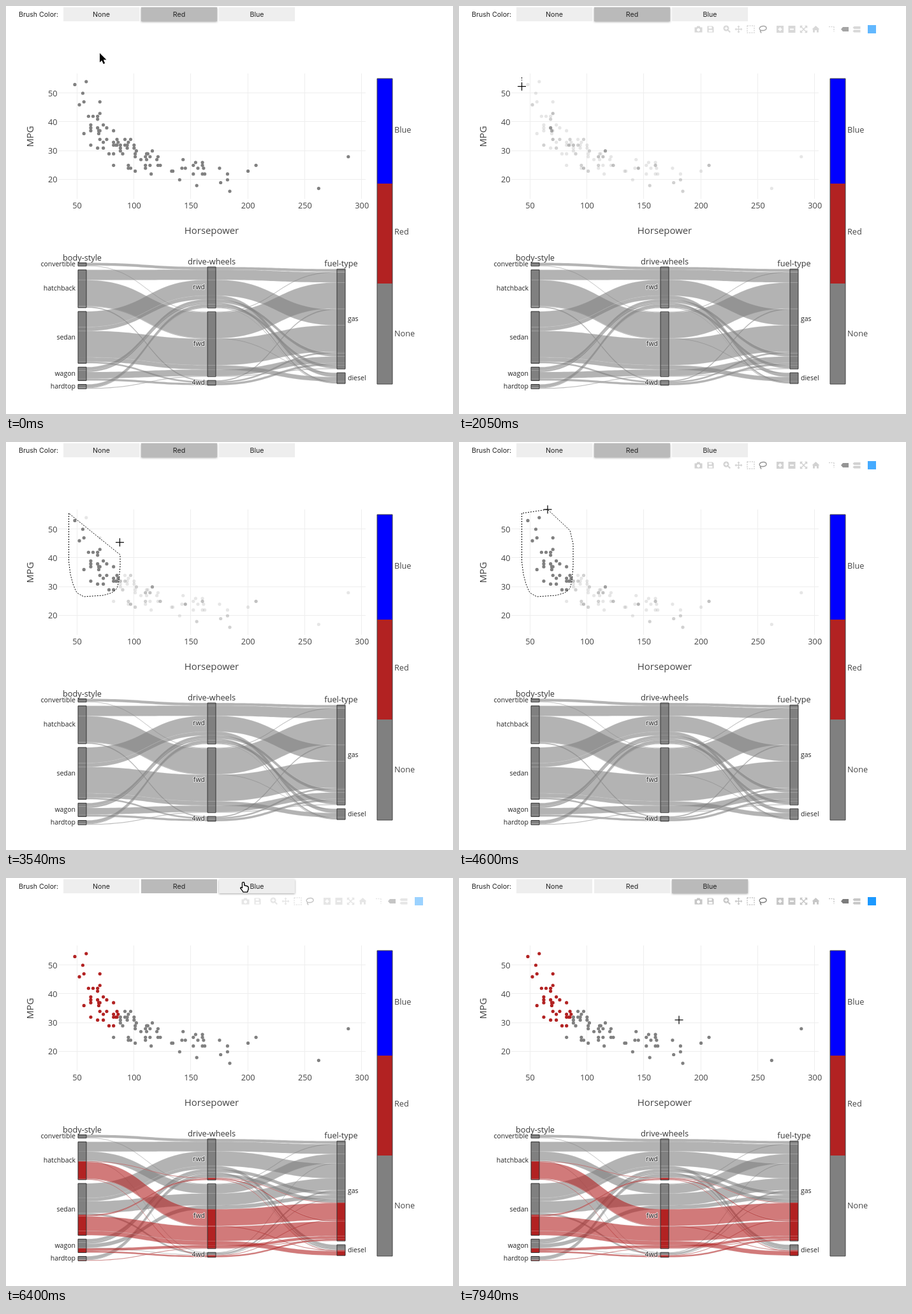
Recreate the animation shown at these times as an HTML page with a canvas. Size 701 by 641 pixels, loop 8000 ms.

```html
<!DOCTYPE html>
<html lang="en">
<head>
<meta charset="utf-8">
<title>Brushed scatter and parallel categories</title>
<style>
html, body { margin: 0; width: 100%; height: 100%; overflow: hidden; background: #fff; }
canvas { display: block; }
</style>
</head>
<body>
<canvas id="stage" width="701" height="641"></canvas>
<script>
const ctx = document.getElementById('stage').getContext('2d');
const LOOP = 8000, GRAY = '#808080', RED = '#b22222', INK = '#444';
const DRAG = 1960, FADE = 2050, BRUSH = 4690, CLEAR = 5605, PRESS = 6665, SWITCH = 7015;

// Pointer track: time, x, y
const track = [
  [180, 147, 74], [830, 95, 119], [1160, 95, 119], [1250, 96, 114], [1510, 98.5, 112],
  [DRAG, 98.5, 112], [2200, 98.5, 150], [2450, 98.5, 188], [2570, 101, 208], [2650, 105, 223],
  [2750, 110, 235], [2840, 113, 238], [3000, 122, 243], [3100, 152, 241], [3200, 166, 237],
  [3280, 174, 230], [3350, 177, 219], [3430, 179, 195], [3530, 179, 160], [3630, 174, 139],
  [4070, 139, 106], [4640, 139, 106], [5070, 266, 167], [5790, 266, 167],
  [6400, 374, 14], [7290, 374, 14], [7940, 345, 223]
];

// Horsepower values for each MPG
const cars = {
  54: [58], 53: [48], 50: [55], 47: [56, 70], 46: [52], 43: [70], 42: [60, 64, 68], 41: [68],
  39: [62, 73], 38: [62, 68, 76], 37: [62, 69, 70, 82], 36: [56, 69], 34: [70, 76, 85, 92, 97],
  33: [73, 82, 86, 95], 32: [62, 82, 84, 85, 88, 92, 94, 100], 31: [68, 73, 88, 94, 100],
  30: [88, 102, 116], 29: [78, 82, 90, 101, 111, 112], 28: [101, 110, 114, 121, 288],
  27: [106, 111, 120, 143], 26: [154, 160], 25: [82, 95, 110, 114, 121, 123, 152, 160, 207],
  24: [95, 97, 110, 142, 145, 156, 161, 175], 23: [101, 133, 134, 200],
  22: [115, 152, 160, 162, 182], 20: [140, 182], 19: [176], 18: [155], 17: [262], 16: [184]
};
// How many cars share a point, as "hp,mpg"
const stacked = {
  '68,38': 8, '69,37': 5, '116,30': 6, '145,24': 4, '70,43': 3, '123,25': 3, '114,28': 3,
  '207,25': 3, '84,32': 3, '85,34': 2, '76,34': 2, '70,34': 3, '52,46': 2, '68,41': 2, '62,32': 2,
  '88,32': 3, '92,32': 2, '97,34': 2, '90,29': 2, '102,30': 2, '110,28': 3, '110,25': 2, '95,25': 2,
  '97,24': 3, '101,23': 2, '160,25': 3, '155,18': 2, '184,16': 2, '182,20': 2, '176,19': 2, '73,31': 2
};
const points = Object.entries(cars).flatMap(([mpg, list]) => list.map(hp => ({
  x: 111.5 + (hp - 50) * 1.787, y: 137 - (mpg - 50) * 4.533, n: stacked[hp + ',' + mpg] || 1
})));

const UNIT = 0.848, GAP = 6, BAR = 13;
const columns = [
  { x: 113, y: 403.5, title: 'body-style', names: ['convertible', 'hatchback', 'sedan', 'wagon', 'hardtop'] },
  { x: 316, y: 410, title: 'drive-wheels', names: ['rwd', 'fwd', '4wd'] },
  { x: 519, y: 413.3, title: 'fuel-type', names: ['gas', 'diesel'] }
];
// Body, drive, fuel, cars outside the brush, cars inside it
const flows = [
  [0, 0, 0, 5, 0], [0, 1, 0, 1, 0], [1, 0, 0, 18, 1], [1, 1, 0, 17, 31], [1, 1, 1, 0, 1], [1, 2, 0, 1, 1],
  [2, 0, 0, 27, 2], [2, 0, 1, 6, 1], [2, 1, 0, 22, 27], [2, 1, 1, 0, 8], [2, 2, 0, 3, 0], [3, 0, 0, 6, 0],
  [3, 0, 1, 3, 0], [3, 1, 0, 7, 5], [3, 2, 0, 1, 3], [4, 0, 0, 6, 0], [4, 0, 1, 1, 0], [4, 1, 0, 0, 1]
];

// Toolbar icons: x, path, style
const icons = [
  [375.5, 'M-6-3h3l1-2h4l1 2h3v8h-12zM0-1.5a2.5 2.5 0 1 0 .01 0z'],
  [394.5, 'M-5-5h8l2 2v8h-10zM-3-4v3h5v-3zM-3 1v3h6v-3z'],
  [420, 'M-1-6a4.5 4.5 0 1 0 .01 0zM-3.5-2.2h1.8v-1.8h1.4v1.8h1.8v1.4h-1.8v1.8h-1.4v-1.8h-1.8zM1.5 2.5l1.5-1.5 3 3-1.5 1.5z'],
  [438.5, 'M0-6l2.2 2.5h-1.5v2.8h2.8v-1.5l2.5 2.2-2.5 2.2v-1.5h-2.8v2.8h1.5l-2.2 2.5-2.2-2.5h1.5v-2.8h-2.8v1.5l-2.5-2.2 2.5-2.2v1.5h2.8v-2.8h-1.5z'],
  [457.5, 'M-5.5-5.5h11v11h-11z', 'dash'],
  [476.5, 'M-3 2C-8-1-4-5 1-5S8 1 1 2C-2 2.5-4 1-4 3S-2 4-3 6', 'active line'],
  [503.5, 'M-5.5-5.5h11v11h-11zM-3-1h2v-2h2v2h2v2h-2v2h-2v-2h-2z'],
  [522, 'M-5.5-5.5h11v11h-11zM-3-1h6v2h-6z'],
  [540.5, 'M-5-2v-3h3M2-5h3v3M5 2v3h-3M-2 5h-3v-3M-5-5l10 10M5-5l-10 10', 'line'],
  [559.5, 'M0-5.5l6 5.5h-1.5v5h-3v-3.5h-3v3.5h-3v-5h-1.5z'],
  [585, 'M-5-4h8M3-4v8', 'dash'],
  [605, 'M-6 0l3-3.5h9v7h-9z', 'active'],
  [623.5, 'M-6-2.5l2-2h10v4h-10zM-6 3l2-2h10v4h-10z']
].map(([x, d, style = '']) => ({ x, path: new Path2D(d), style }));

const arrow = new Path2D('M0 0v14.5l3.3-3 2.4 5.5 2.5-1.1-2.4-5.3h4.7z');
const hand = new Path2D('M-3-7c1.600-1 2.600 0 2.700 1.500v3.500c1-.7 2-.3 2.300.6 1-.6 2-.2 2.200.7 1-.3 1.800.3 1.800 1.500v3l-1.500 4.200h-6.500c-1-2-2.300-3.500-4-5.500-.8-1.500 1-2.500 2.500-.8v-8z');

function text(str, x, y, size, { align = 'left', color = INK, family = '"Open Sans"', halo } = {}) {
  ctx.font = `${size}px ${family}, sans-serif`;
  ctx.textAlign = align;
  if (halo) {
    ctx.strokeStyle = 'rgba(255,255,255,.65)';
    ctx.lineWidth = 2;
    ctx.lineJoin = 'round';
    ctx.strokeText(str, x, y);
  }
  ctx.fillStyle = color;
  ctx.fillText(str, x, y);
}

function box(x, y, w, h, fill, stroke) {
  ctx.fillStyle = fill;
  ctx.fillRect(x, y, w, h);
  if (!stroke) return;
  ctx.strokeStyle = stroke;
  ctx.lineWidth = 1;
  ctx.strokeRect(x, y, w, h);
}

function pointer(t) {
  const i = track.findIndex(k => k[0] > t);
  if (i === 0) return track[0].slice(1);
  if (i < 0) return track[track.length - 1].slice(1);
  const [a, b] = [track[i - 1], track[i]];
  const p = (t - a[0]) / (b[0] - a[0]);
  return [a[1] + (b[1] - a[1]) * p, a[2] + (b[2] - a[2]) * p];
}

// The outline trails the pointer a little
function lassoAt(t) {
  const end = Math.min(t - 60, 4600), path = new Path2D();
  track.filter(k => k[0] >= DRAG && k[0] < end).forEach(k => path.lineTo(k[1], k[2]));
  path.lineTo(...pointer(end));
  path.closePath();
  return path;
}

const brushed = lassoAt(BRUSH);

function drawButtons(t) {
  text('Brush Color:', 20, 17, 10.6, { family: 'Inter', color: '#222' });
  const selected = t < SWITCH ? 'Red' : 'Blue';
  const focused = t < 6300 ? 'Red' : 'Blue';
  const pressed = t >= PRESS && t < PRESS + 80;
  ['None', 'Red', 'Blue'].forEach((name, i) => {
    const x = 90 + i * 122;
    ctx.save();
    if (name === focused) {
      ctx.shadowColor = 'rgba(0,0,0,.35)';
      ctx.shadowBlur = 3;
      ctx.shadowOffsetY = 1;
    }
    box(x, 2, 119, 22, name === selected || (pressed && name === 'Blue') ? '#bababa' : '#eee');
    ctx.restore();
    text(name, x + 59.5, 17, 10.6, { family: 'Inter', color: '#222', align: 'center' });
  });
}

function drawToolbar(t) {
  const ramp = start => 1 - (1 - Math.min(1, Math.max(0, (t - start) / 300))) ** 2;
  const shown = ramp(1160) - ramp(2000) + ramp(4430) - ramp(6300) + ramp(7420);
  if (shown <= 0) return;
  for (const { x, path, style } of icons) {
    ctx.save();
    ctx.translate(x, 36.5);
    ctx.globalAlpha = shown * (style.includes('active') ? 0.7 : 0.3);
    ctx.fillStyle = ctx.strokeStyle = INK;
    ctx.lineWidth = 1.5;
    if (style.includes('dash')) ctx.setLineDash([2, 1.5]);
    if (/dash|line/.test(style)) ctx.stroke(path);
    else ctx.fill(path, 'evenodd');
    ctx.restore();
  }
  ctx.globalAlpha = shown;
  box(641, 30, 13, 13, '#1c99ff');
  ctx.globalAlpha = 1;
}

function drawAxes() {
  for (let i = 0; i < 6; i++) {
    const x = 111.5 + i * 89.35;
    box(Math.round(x) - 1, 106, 1, 197, '#eee');
    text(50 + i * 50, x, 318, 12.7, { align: 'center' });
  }
  for (let i = 0; i < 4; i++) {
    const y = 137 + i * 45.33;
    box(82, Math.round(y) - 1, 482, 1, '#eee');
    text(50 - i * 10, 80.5, y + 4.5, 12.7, { align: 'right' });
  }
  text('Horsepower', 322.5, 358, 14.9, { align: 'center' });
  ctx.save();
  ctx.translate(43, 205);
  ctx.rotate(-Math.PI / 2);
  text('MPG', 0, 0, 14.9, { align: 'center' });
  ctx.restore();
}

function drawScatter(t) {
  const dragging = t >= FADE && t < BRUSH;
  const lasso = dragging ? lassoAt(t) : brushed;
  for (const { x, y, n } of points) {
    const inside = ctx.isPointInPath(lasso, x, y);
    ctx.globalAlpha = t >= FADE && t < CLEAR && !inside ? 1 - 0.8 ** n : 1;
    ctx.fillStyle = inside && t >= BRUSH ? RED : GRAY;
    ctx.beginPath();
    ctx.arc(x, y, 2.6, 0, 7);
    ctx.fill();
  }
  ctx.globalAlpha = 1;
  if (dragging) {
    ctx.save();
    ctx.setLineDash([2, 2]);
    ctx.strokeStyle = '#000';
    ctx.lineWidth = 1;
    ctx.stroke(lasso);
    ctx.restore();
  }
}

function drawTooltip() {
  ctx.beginPath();
  [[109, 123.5], [115, 118.5], [115, 115.500], [156, 115.500], [156, 131.500], [115, 131.500], [115, 128.500]]
    .forEach(p => ctx.lineTo(...p));
  ctx.closePath();
  ctx.fillStyle = GRAY;
  ctx.fill();
  ctx.strokeStyle = INK;
  ctx.lineWidth = 1;
  ctx.stroke();
  const family = '"Liberation Sans"';
  text('(48, 53)', 118, 127.5, 10.5, { family });
  text('trace 0', 158, 127.5, 10.5, { family, color: GRAY });
}

function drawColorBar() {
  box(582, 114, 24, 165, '#00f');
  box(582, 279, 24, 157, RED);
  box(582, 436, 24, 158, GRAY);
  ctx.strokeStyle = INK;
  ctx.lineWidth = 1;
  ctx.strokeRect(582, 114, 24, 480);
  ['Blue', 'Red', 'None'].forEach((name, i) => text(name, 609, 198.5 + i * 160, 12.7));
}

// Stack every flow in each column, unbrushed ones first
function layout(split) {
  const bands = (split ? [3, 4] : [0]).flatMap(k => flows.map(f => ({
    cats: f.slice(0, 3), size: UNIT * (k ? f[k] : f[3] + f[4]), color: k === 4 ? RED : GRAY, ys: []
  }))).filter(b => b.size);
  const bars = [];
  columns.forEach((col, c) => {
    let y = col.y;
    col.names.forEach((name, i) => {
      const top = y;
      for (const b of bands) if (b.cats[c] === i) { b.ys[c] = y; y += b.size; }
      bars.push({ name, c, x: col.x, top, height: y - top });
      y += GAP;
    });
  });
  return { bands, bars };
}
const layouts = [layout(false), layout(true)];

function drawCategories(t) {
  const { bands, bars } = layouts[t >= BRUSH ? 1 : 0];
  for (const { ys, size, color } of bands) {
    ctx.beginPath();
    for (let c = 0; c < 2; c++) {
      const x0 = columns[c].x + BAR, x1 = columns[c + 1].x, mid = (x0 + x1) / 2;
      ctx.moveTo(x0, ys[c]);
      ctx.bezierCurveTo(mid, ys[c], mid, ys[c + 1], x1, ys[c + 1]);
      ctx.lineTo(x1, ys[c + 1] + size);
      ctx.bezierCurveTo(mid, ys[c + 1] + size, mid, ys[c] + size, x0, ys[c] + size);
      ctx.closePath();
    }
    ctx.globalAlpha = 0.6;
    ctx.fillStyle = color;
    ctx.fill();
    ctx.globalAlpha = 1;
    ctx.strokeStyle = 'lightgray';
    ctx.lineWidth = 0.2;
    ctx.stroke();
  }
  for (const { ys, size, color } of bands) {
    columns.forEach((col, c) => box(col.x, ys[c], BAR, size, color));
  }
  for (const { name, c, x, top, height } of bars) {
    ctx.strokeStyle = '#333';
    ctx.lineWidth = 1;
    ctx.strokeRect(x, top, BAR, height);
    const last = c === 2;
    text(name, last ? x + BAR + 4 : x - 4, top + height / 2 + 3, 10.5,
      { align: last ? 'left' : 'right', color: '#222', halo: true });
  }
  for (const { x, y, title } of columns) {
    text(title, x + BAR / 2, y - 4, 12.7, { align: 'center', color: '#333' });
  }
}

function drawPointer(t) {
  const [x, y] = pointer(t);
  const inPlot = t >= 1160 && y > 105;
  ctx.save();
  ctx.translate(x, y);
  if (inPlot) {
    box(-6.5, -0.6, 13, 1.2, '#000');
    box(-0.6, -6.5, 1.2, 13, '#000');
  } else {
    const onButton = y < 25;
    const shape = onButton ? hand : arrow;
    ctx.lineJoin = 'round';
    ctx.lineWidth = onButton ? 1.2 : 2;
    ctx.fillStyle = onButton ? '#fff' : '#000';
    ctx.strokeStyle = onButton ? '#000' : '#fff';
    ctx.stroke(shape);
    ctx.fill(shape);
    if (onButton) ctx.stroke(shape);
  }
  ctx.restore();
}

function draw() {
  const t = performance.now() % LOOP;
  box(0, 0, 701, 641, '#fff');
  drawButtons(t);
  drawToolbar(t);
  drawAxes();
  drawScatter(t);
  if (t >= 1160 && t < FADE) drawTooltip();
  drawColorBar();
  drawCategories(t);
  drawPointer(t);
  requestAnimationFrame(draw);
}
draw();
</script>
</body>
</html>
```
